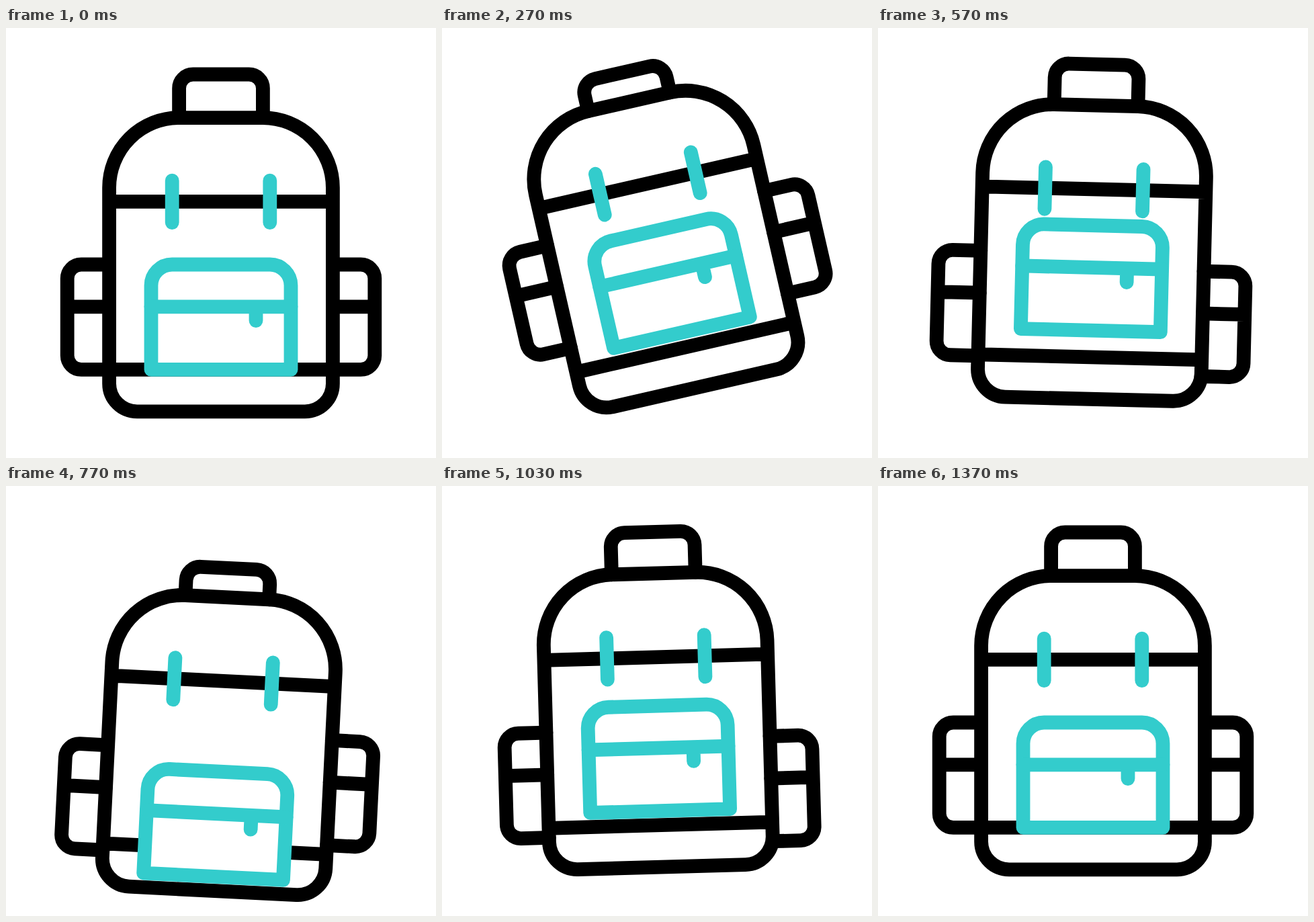
An HTML page for the animation above (1670 ms loop, 640 px wide and 640 px high).

```html
<!DOCTYPE html>
<html lang="en">
<head>
<meta charset="utf-8">
<title>Backpack</title>
<style>
  html, body { margin: 0; height: 100%; overflow: hidden; background: #fff; }
  svg { display: block; width: 100vw; height: 100vh; }
  g { fill: none; stroke: #000; stroke-width: 20.8; stroke-linecap: round; stroke-linejoin: round; }
  .teal { stroke: #3cc; }
</style>
</head>
<body>
<svg viewBox="0 0 640 640">
  <g id="bag">
    <path id="handle"/>
    <path id="left" d="M153.6 352H112a20.8 20.8 0 0 0-20.8 20.8V487.6A20.8 20.8 0 0 0 112 508.4H153.6M91.2 414.8H153.6"/>
    <path id="right" d="M486.4 352H528a20.8 20.8 0 0 1 20.8 20.8V487.6A20.8 20.8 0 0 1 528 508.4H486.4M548.8 414.8H486.4"/>
    <path d="M153.6 237.6a104 104 0 0 1 104-104H382.4a104 104 0 0 1 104 104V529.2a41.6 41.6 0 0 1-41.6 41.6H195.2a41.6 41.6 0 0 1-41.6-41.6ZM153.6 258.4H486.4M153.6 508.4H486.4"/>
    <g id="front" class="teal">
      <path fill="#fff" d="M216 508.4V383.2A31.2 31.2 0 0 1 247.2 352H392.8A31.2 31.2 0 0 1 424 383.2V508.4Z"/>
      <path d="M216 414.8H424M372 414.8V435.6"/>
    </g>
    <path class="teal" d="M247.2 227.2V289.6M392.8 227.2V289.6"/>
  </g>
</svg>
<script>
const LOOP = 1670, FPS = 30, REST = 41, DECAY = 0.8;
const BEATS = [0, 12, 20, 26, 32, 38];

// Linear motion through [frame, value] points.
function along(points, frame) {
  const next = points.findIndex(([time]) => time > frame);
  if (next < 1) return points.at(next)[1];
  const [t0, v0] = points[next - 1], [t1, v1] = points[next];
  return v0 + (v1 - v0) * (frame - t0) / (t1 - t0);
}

// A jump that swings up and down on the beats, each peak smaller than the last.
function bounce(frame, delay, size) {
  const points = BEATS.map((beat, i) => {
    const time = Math.min(REST, Math.max(0, beat + delay));
    const atEnd = i === 0 || i === BEATS.length - 1;
    return [time, atEnd ? 0 : -size * (-DECAY) ** (i - 1)];
  });
  return along(points, frame);
}

const tilt = frame => along([[0, 0], [10, -16.1], [20, 8.9], [26, -3.2], [36, 0]], frame);
const squash = frame => along([[0, 0], [8, 20], [16, -1], [22, 26], [28, -3], [31, 3], [36, 0]], frame);

const set = (id, name, value) => document.getElementById(id).setAttribute(name, value);
const shift = (id, y) => set(id, "transform", `translate(0 ${y})`);

function draw(now) {
  // Times are rounded to hundredths of a second, hence the small lead.
  const frame = Math.floor((now % LOOP + 3.4) * FPS / 1000);
  set("bag", "transform", `translate(0 ${bounce(frame, 2, 57)}) rotate(${tilt(frame)} 320 320)`);
  shift("left", bounce(frame, 0.4, 58));
  shift("right", bounce(frame, -1.3, 59));
  shift("front", bounce(frame, 3.5, 60));
  const shoulder = 89.8 + squash(frame);
  set("handle", "d", `M257.6 133.6V${shoulder}a20.8 20.8 0 0 1 20.8-20.8H361.6a20.8 20.8 0 0 1 20.8 20.8V133.6`);
  requestAnimationFrame(() => draw(performance.now() - start));
}

const start = performance.now();
draw(0);
</script>
</body>
</html>
```
